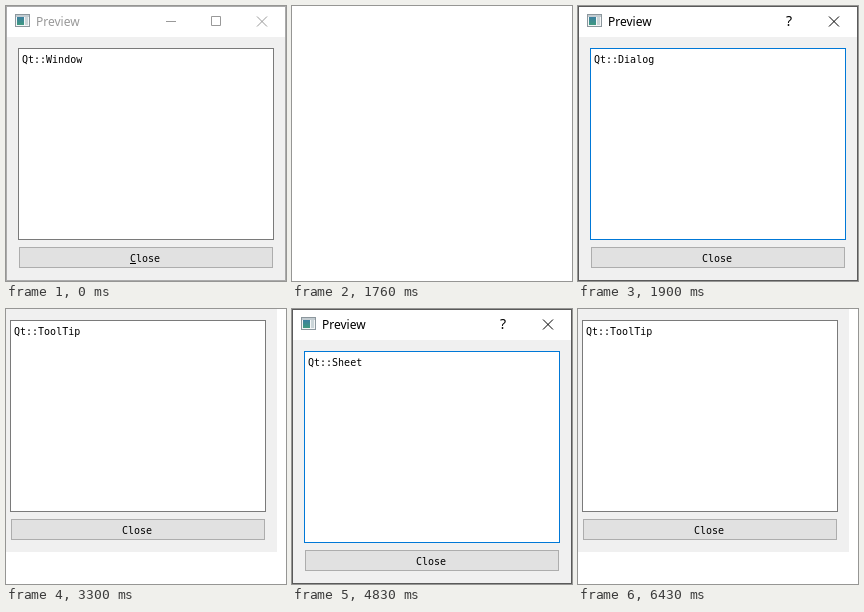
An HTML page that plays this animation: 280x275 px, repeating every 8 s.

```html
<!DOCTYPE html>
<html lang="en">
<head>
<meta charset="utf-8">
<title>Window flags preview</title>
<style>
  html, body { margin: 0; width: 100%; height: 100%; overflow: hidden; background: #fff; }
  svg { display: block; width: 280px; height: 275px; }
  rect { shape-rendering: crispEdges; }
  text { white-space: pre; }

  .mono { font: 10px "DejaVu Sans Mono", monospace; fill: #000; }
  .title { font: 12px "Noto Sans", sans-serif; fill: var(--ink); }
  .help { font: 14px "Noto Sans", sans-serif; fill: var(--ink); text-anchor: middle; }
  .frame { fill: #fff; stroke: var(--frame); }
  .edit { fill: #fff; stroke: var(--edge); }
  .glyph { fill: none; stroke: var(--ink); }

  .scene {
    --ink: #999; --frame: #aaa; --edge: #7a7a7a;
    visibility: hidden;
    animation: 8s step-end infinite;
  }
  .window { animation-name: window; }
  .popup { --edge: #0078d7; animation-name: popup; }
  .dialog { animation-name: dialog, dialog-active, dialog-focus; }
  .sheet { animation-name: sheet, sheet-active; }
  .tooltip { animation-name: tooltip; }

  @keyframes window {
    0% { visibility: visible; }
    6.25%, 100% { visibility: hidden; }
  }
  @keyframes popup {
    0%, 22%, 100% { visibility: hidden; }
    6.25% { visibility: visible; }
  }
  @keyframes dialog {
    0%, 41.25%, 100% { visibility: hidden; }
    23.75% { visibility: visible; }
  }
  @keyframes dialog-active {
    0% { --ink: #000; --frame: #5a5a5a; }
    37%, 100% { --ink: #999; --frame: #aaa; }
  }
  @keyframes dialog-focus {
    0% { --edge: #0078d7; }
    37.875%, 100% { --edge: #7a7a7a; }
  }
  @keyframes sheet {
    0%, 80.375%, 100% { visibility: hidden; }
    60.375% { visibility: visible; }
  }
  @keyframes sheet-active {
    0% { --ink: #000; --frame: #5a5a5a; --edge: #0078d7; }
    72.875%, 100% { --ink: #999; --frame: #aaa; --edge: #7a7a7a; }
  }
  @keyframes tooltip {
    0%, 60.375% { visibility: hidden; }
    41.25%, 80.375%, 100% { visibility: visible; }
  }
</style>
</head>
<body>
<svg viewBox="0 0 280 275">
  <defs>
    <linearGradient id="pane" x2="0" y2="1">
      <stop stop-color="#3c7fa0"/>
      <stop offset="1" stop-color="#3f9a80"/>
    </linearGradient>

    <g id="client">
      <rect width="278" height="243" fill="#f0f0f0"/>
      <rect class="edit" x="11.5" y="11.5" width="255" height="191"/>
      <rect x="12.5" y="210.5" width="253" height="20" fill="#e1e1e1" stroke="#adadad"/>
      <text class="mono" x="123" y="225">Close</text>
    </g>

    <rect id="mnemonic" x="123" y="226" width="6" height="1"/>

    <g id="chrome">
      <rect class="frame" x=".5" y=".5" width="279" height="274"/>
      <rect x="9.5" y="8.5" width="14" height="12" fill="#f4f6f7" stroke="#8c979d"/>
      <rect x="10" y="9" width="13" height="2" fill="#c3ccd1"/>
      <rect x="11" y="11" width="7" height="8" fill="url(#pane)"/>
      <rect x="19" y="11" width="3" height="8" fill="#cbd5d8"/>
      <text class="title" x="30" y="20">Preview</text>
      <path class="glyph" d="M251 10.5l10 10m0-10l-10 10"/>
    </g>

    <g id="dialog-chrome">
      <use href="#chrome"/>
      <text class="help" x="211" y="20">?</text>
    </g>
  </defs>

  <g class="scene window">
    <use href="#chrome"/>
    <path class="glyph" d="M160 15.5h10M205.5 10.5h9v9h-9z"/>
    <g transform="translate(1 31)">
      <use href="#client"/>
      <use href="#mnemonic"/>
      <text class="mono" x="15" y="26">Qt::Window</text>
    </g>
  </g>

  <g class="scene popup">
    <use href="#client"/>
    <use href="#mnemonic"/>
    <text class="mono" x="15" y="26">Qt::Popup</text>
  </g>

  <g class="scene dialog">
    <use href="#dialog-chrome"/>
    <g transform="translate(1 31)">
      <use href="#client"/>
      <text class="mono" x="15" y="26">Qt::Dialog</text>
    </g>
  </g>

  <g class="scene sheet">
    <use href="#dialog-chrome"/>
    <g transform="translate(1 31)">
      <use href="#client"/>
      <text class="mono" x="15" y="26">Qt::Sheet</text>
    </g>
  </g>

  <g class="scene tooltip">
    <g transform="translate(-7 0)">
      <use href="#client"/>
      <text class="mono" x="15" y="26">Qt::ToolTip</text>
    </g>
  </g>
</svg>
</body>
</html>
```
